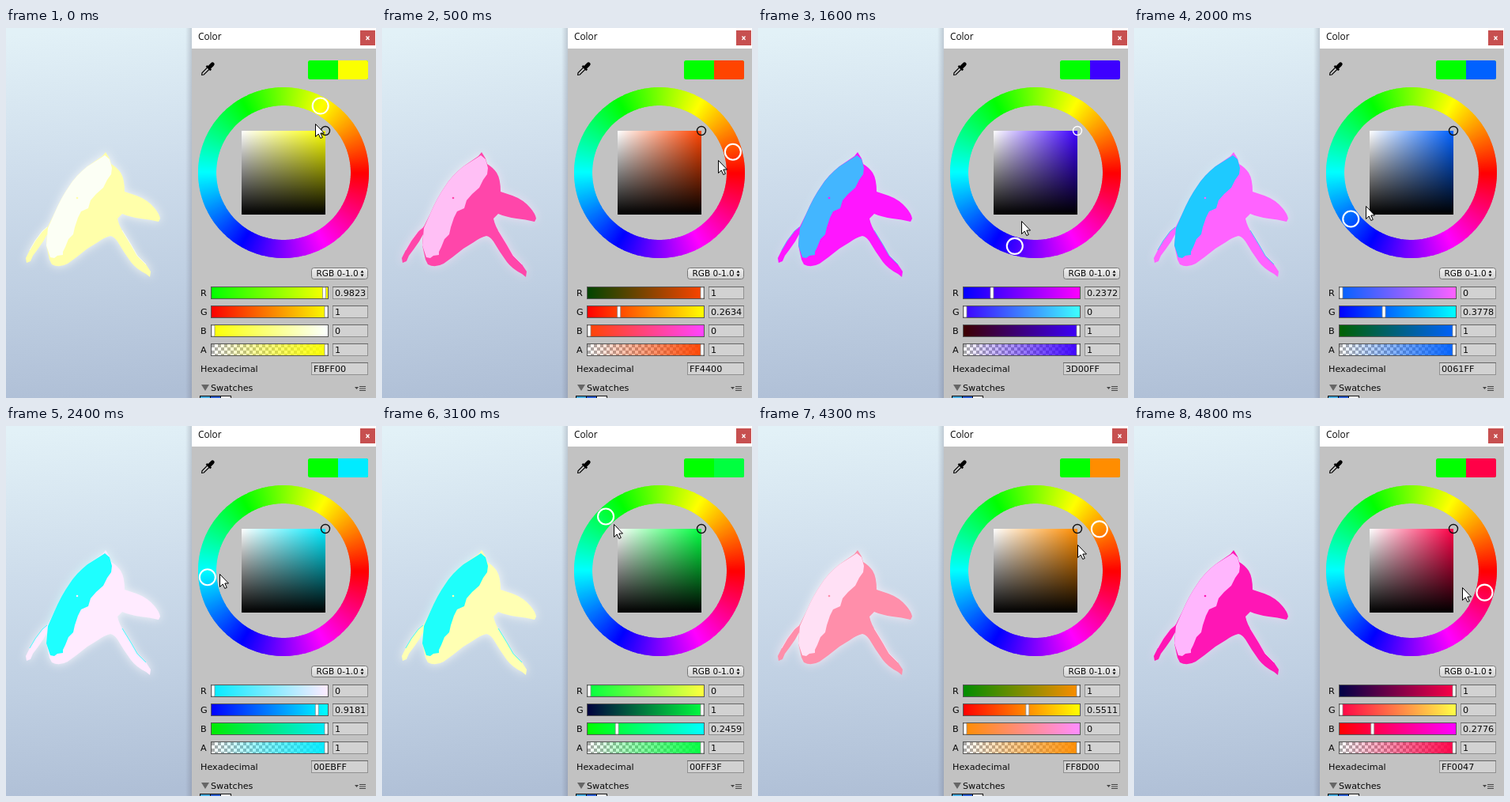
Recreate the animation shown at these times as an HTML page. Size 468x468 px, loop 4900 ms.

```html
<!DOCTYPE html>
<html lang="en">
<head>
<meta charset="utf-8">
<title>Color picker</title>
<style>
  html, body { margin: 0; width: 100%; height: 100%; overflow: hidden; background: #c2c2c2; }
  svg { display: block; width: 468px; height: 468px; }
  text { font: 11.2px "DejaVu Sans", sans-serif; fill: #080808; }
  #glow { mix-blend-mode: screen; }
</style>
</head>
<body>
<svg id="stage" viewBox="0 0 468 468">
  <defs>
    <linearGradient id="sky" gradientUnits="userSpaceOnUse" x1="80" y1="0" x2="130" y2="468">
      <stop offset="0" stop-color="#e2f1f7"/>
      <stop offset=".4" stop-color="#cddceb"/>
      <stop offset=".7" stop-color="#bfcfe2"/>
      <stop offset="1" stop-color="#afbfd6"/>
    </linearGradient>
    <linearGradient id="edge">
      <stop offset="0" stop-color="#556" stop-opacity="0"/>
      <stop offset="1" stop-color="#556" stop-opacity=".24"/>
    </linearGradient>
    <linearGradient id="white">
      <stop offset="0" stop-color="#fff"/>
      <stop offset="1" stop-color="#fff" stop-opacity="0"/>
    </linearGradient>
    <linearGradient id="black" x2="0" y2="1">
      <stop offset="0" stop-opacity="0"/>
      <stop offset="1"/>
    </linearGradient>
    <linearGradient id="button" x2="0" y2="1">
      <stop offset="0" stop-color="#f2f2f2"/>
      <stop offset="1" stop-color="#d2d2d2"/>
    </linearGradient>
    <pattern id="checker" width="8" height="8" x="260" y="400" patternUnits="userSpaceOnUse">
      <path d="M0 0H8V8H0Z" fill="#fff"/>
      <path d="M0 0H4V8H8V4H0Z" fill="#aaa"/>
    </pattern>
    <filter id="blur" x="-30%" y="-30%" width="160%" height="160%"><feGaussianBlur stdDeviation="6"/></filter>
    <g id="whale">
      <path id="body" d="M126 157L131 165 133 172Q140 176 145 183 150 191 150 207
        L165 212Q179 217 188 228 194 235 195 241L193 245Q181 242 170 241 157 239 147 235L141 241
        Q143 251 150 261L158 274 166 288 177 299 183 308 182 315 177 311Q165 305 158 296
        L149 283 141 270Q137 264 132 263 124 265 116 271L103 279 89 290 78 298Q67 304 58 299
        L55 293 51 275 52 261 47 270 40 280 34 288 31 295 26 297 25 291 30 281 37 269 46 257 53 251
        61 235Q70 214 80 200 88 187 103 175L122 162Z"/>
      <path id="back" d="M125 161L131 166 134 177 133 185 128 192 123 202 114 210 107 218 104 228
        95 232 91 240 87 252 85 261 79 267 75 277 72 283 72 287 65 288 61 291 56 290
        51 275 53 253 61 235Q70 214 80 200 88 187 103 175L122 163Z"/>
      <path id="trim" fill="none" stroke-width=".8" d="M52 252L46 257 37 269 30 281M147 256L158 274 166 288 177 299"/>
    </g>
  </defs>

  <rect width="236" height="468" fill="url(#sky)"/>
  <use id="glow" href="#whale" filter="url(#blur)"/>
  <use href="#whale"/>
  <circle id="eye" cx="90" cy="215" r="1.3"/>
  <rect x="227" width="8" height="468" fill="url(#edge)"/>

  <rect x="235" width="233" height="468" fill="#c2c2c2"/>
  <rect x="235" width="233" height="26" fill="#fff"/>
  <text x="243" y="15" style="font:11.8px 'Open Sans',sans-serif">Color</text>
  <rect x="448" y="3" width="19" height="19" fill="#c75050"/>
  <path d="M455.500 10.500l4 4.500m0-4.500l-4 4.500" stroke="#fff" stroke-width="1.3"/>

  <g transform="translate(247 60) rotate(-45)">
    <path d="M1 0L3-1.600H13V1.600H3Z" fill="#ccc" stroke="#000" stroke-width="1.200"/>
    <path d="M12-4h2.500V-2.500h5q3 0 3 2.500t-3 2.500h-5V4H12Z"/>
  </g>
  <rect x="382" y="41" width="76" height="24" rx="2.500" fill="#0f0"/>
  <path id="swatch" d="M420 41h35.500q2.500 0 2.500 2.500v19q0 2.500-2.500 2.500H420Z"/>

  <g id="wheel" fill="none" stroke-width="23"></g>
  <rect id="hueBox" x="298" y="130" width="106" height="106"/>
  <rect x="298" y="130" width="106" height="106" fill="url(#white)"/>
  <rect x="298" y="130" width="106" height="106" fill="url(#black)"/>
  <circle id="pick" cx="404" cy="130" r="5.5" fill="none" stroke-width="1.4"/>
  <circle id="handle" r="10" fill="none" stroke="#fff" stroke-width="2.1"/>

  <rect x="386.500" y="303.500" width="71" height="14" rx="3" fill="url(#button)" stroke="#777"/>
  <text x="392.500" y="314" style="font-size:10.5px">RGB 0-1.0</text>
  <path d="M448.500 309.500l2-3 2 3ZM448.500 311.500l2 3 2-3Z"/>

  <g id="sliders"></g>
  <text x="246" y="435">Hexadecimal</text>
  <path d="M247 451h10l-5 8Z" fill="#666"/>
  <text x="259" y="459">Swatches</text>
  <path d="M441 454h5l-2.500 3Z" fill="#444"/>
  <path d="M447 453.500h8m-8 2.500h8m-8 2.500h8" stroke="#444"/>
  <g stroke="#111">
    <rect x="245.500" y="465.500" width="13" height="13" fill="#47a9dc"/>
    <rect x="258.500" y="465.500" width="13" height="13" fill="#2c5fd0"/>
    <rect x="271.500" y="465.500" width="13" height="13" fill="#fff"/>
  </g>
  <path id="cursor" d="M.5.500V16.500L4.200 13 6.800 18.500 9.300 17.400 6.800 12H11.500Z" fill="#fff" stroke="#000"/>
</svg>
<script>
const $ = id => document.getElementById(id);
const set = (el, attrs) => { for (const k in attrs) el.setAttribute(k, attrs[k]); return el; };
const add = (parent, tag, attrs) =>
  parent.appendChild(set(document.createElementNS("http://www.w3.org/2000/svg", tag), attrs));

const LOOP = 4900, STEP = 100;
const CENTER = { x: 351, y: 183 };
const polar = (deg, r) => {
  const a = deg * Math.PI / 180;
  return { x: CENTER.x + r * Math.cos(a), y: CENTER.y - r * Math.sin(a) };
};

// time, hue, cursor angle, cursor radius
const drag = [
  [0, 61.062, 57.2, 74],
  [1000, -32.202, -34.7, 75],
  [1600, -105.768, -106.4, 64],
  [2400, -175.086, -177.2, 81],
  [3100, -225.246, -225.5, 83],
  [3700, -269.532, -270, 62],
  [4800, -376.656, -378.2, 67]
];

function slope(i, c) {
  const a = drag[Math.max(i - 1, 0)], b = drag[Math.min(i + 1, drag.length - 1)];
  return (b[c] - a[c]) / (b[0] - a[0]);
}

function track(t, c) {
  let i = 0;
  while (i < drag.length - 2 && t >= drag[i + 1][0]) i++;
  const a = drag[i], b = drag[i + 1], d = b[0] - a[0], u = (t - a[0]) / d;
  const s = u * u * (3 - 2 * u);
  return a[c] + (b[c] - a[c]) * s
    + d * u * (1 - u) * ((1 - u) * slope(i, c) - u * slope(i + 1, c));
}

function hueColor(hue) {
  const channel = shift => {
    const k = (((hue + shift) / 60) % 6 + 6) % 6;
    return Math.min(1, Math.max(0, Math.abs(k - 3) - 1));
  };
  return [channel(0), channel(240), channel(120)];
}
const bytes = color => color.map(v => Math.max(0, Math.ceil(v * 255 - 1e-6)));
const css = color => `rgb(${bytes(color)})`;

// Emission is added to the surface colour in linear light.
const emit = (base, color) => css(base.map((v, i) =>
  Math.min(1, (v / 255) ** 2.2 + color[i] ** 2.2) ** (1 / 2.2)));

for (let h = 0; h < 360; h++) {
  const a = polar(h - 0.3, 96.5), b = polar(h + 1.3, 96.5);
  add($("wheel"), "path", { d: `M${a.x} ${a.y}A96.5 96.5 0 0 0 ${b.x} ${b.y}`, stroke: css(hueColor(h + 0.5)) });
}

function field(x, y) {
  const g = $("sliders"), right = 457.5;
  add(g, "rect", { x: x + .5, y: y + .5, width: right - x - .5, height: 15, fill: "#d2d2d2", stroke: "#909090" });
  add(g, "path", { d: `M${x} ${y + .5}H458`, stroke: "#666" });
  return add(g, "text", { x: x + 3, y: y + 12 });
}

const sliders = [..."RGBA"].map((name, i) => {
  const g = $("sliders"), y = 327 + 24 * i;
  const box = { x: 259.5, y: y + .5, width: 148, height: 15 };
  add(g, "text", { x: 246, y: y + 12 }).textContent = name;
  const grad = add(g, "linearGradient", { id: "ramp" + name });
  const stops = [0, 1].map(offset => add(grad, "stop", { offset }));
  if (name === "A") {
    add(g, "rect", { ...box, fill: "url(#checker)" });
    set(stops[0], { "stop-opacity": 0 });
  }
  add(g, "rect", { ...box, fill: `url(#ramp${name})`, stroke: "#555" });
  const thumb = add(g, "rect", { y: y + 1, width: 4, height: 14, rx: 1, fill: "#fff", stroke: "#888", "stroke-width": .8 });
  return { stops, thumb, label: field(413, y) };
});
const hexLabel = field(386, 423);

function draw(time) {
  const t = Math.floor(time % LOOP / STEP) * STEP;
  const hue = track(t, 1), color = hueColor(hue), fill = css(color);
  const luma = .299 * color[0] + .587 * color[1] + .114 * color[2];

  const dark = emit([255, 22, 170], color), light = emit([30, 182, 245], color);
  set($("body"), { fill: dark });
  set($("back"), { fill: light });
  set($("trim"), { stroke: light });
  set($("eye"), { fill: dark });
  set($("glow"), { opacity: Math.min(.85, .15 + 1.2 * luma) });

  set($("swatch"), { fill });
  set($("hueBox"), { fill });
  set($("pick"), { stroke: luma < .25 ? "#fff" : "#111" });
  const knob = polar(hue, 96.5), tip = polar(track(t, 2), track(t, 3));
  set($("handle"), { cx: knob.x, cy: knob.y });
  set($("cursor"), { transform: `translate(${Math.round(tip.x)} ${Math.round(tip.y)})` });

  sliders.forEach(({ stops, thumb, label }, i) => {
    const value = i < 3 ? color[i] : 1;
    stops.forEach((stop, end) =>
      set(stop, { "stop-color": css(color.map((v, c) => c === i ? end : v)) }));
    set(thumb, { x: 260 + 143 * value });
    label.textContent = +value.toFixed(4);
  });
  hexLabel.textContent = bytes(color).map(v => v.toString(16).padStart(2, "0")).join("").toUpperCase();
}

const start = performance.now();
function tick() {
  draw(performance.now() - start);
  requestAnimationFrame(tick);
}
tick();
</script>
</body>
</html>
```
